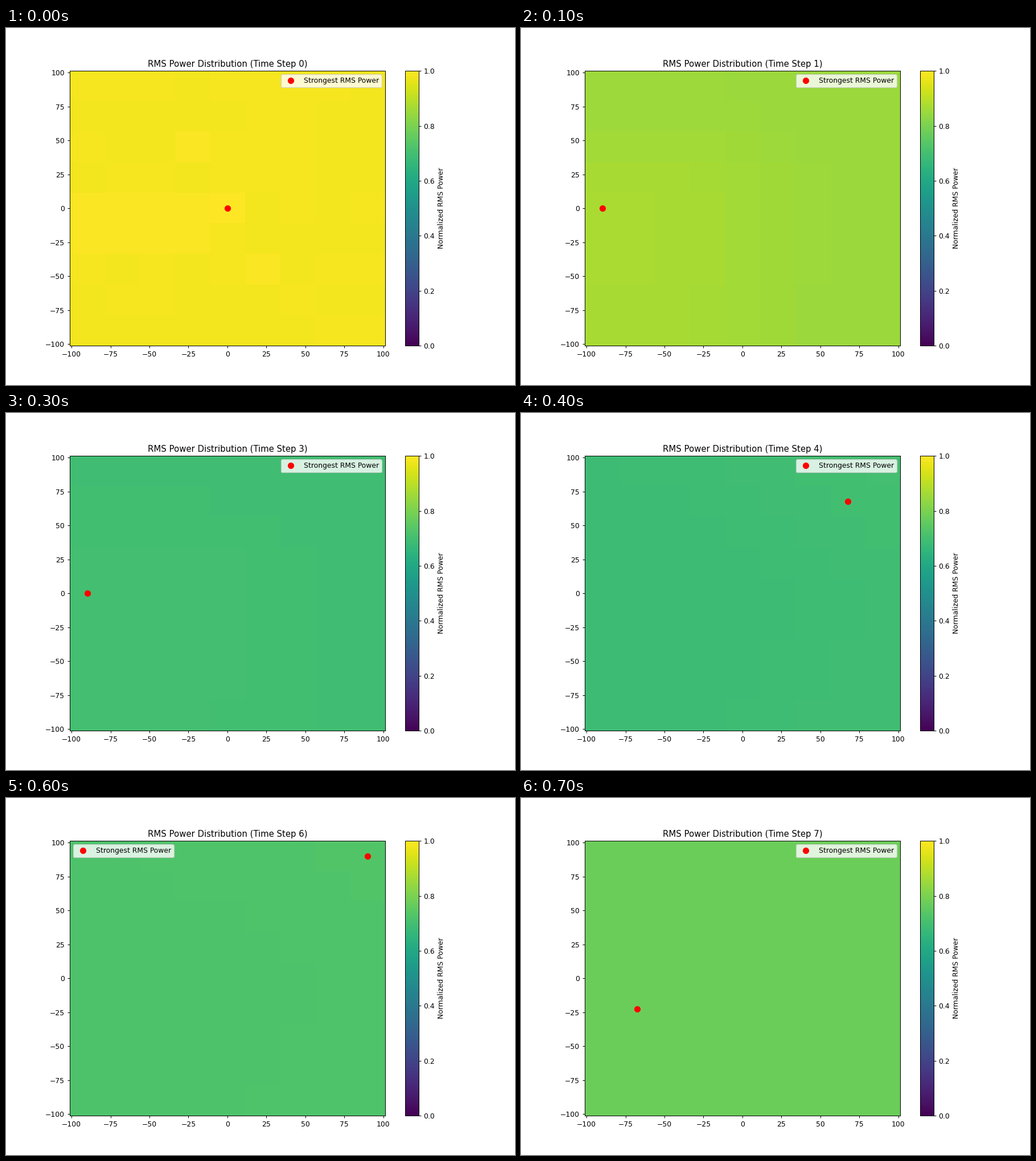
These frames come from a looping animation (894 by 626 pixels, 0.8 s). A matplotlib script:

```python
import matplotlib.pyplot as plt
import numpy as np
from matplotlib.animation import FuncAnimation

DPI = 89.4
STEPS = 8
CELLS = 9
PITCH = 22.5
HALF = CELLS * PITCH / 2
LEVELS = 256  # colour levels of the map

axis = (np.arange(CELLS) - CELLS // 2) * PITCH
X, Y = np.meshgrid(axis, axis)


def fall(t, middle, width):
    """Smooth drop from 1 to 0 around the middle."""
    return 1 / (1 + np.exp((t - middle) / width))


def ripple():
    """Nearly saturated noise with a bright band left of the centre."""
    drop = np.random.default_rng(4).integers(3, 5, X.shape)
    drop[(X < 0) & (abs(Y + PITCH / 2) < PITCH)] = 1
    drop[abs(X + Y / 2) + abs(Y) < 1] = 0
    drop[(X == -Y / 2) & (abs(Y) == 2 * PITCH)] = 1
    return LEVELS - 1 - drop


def lobe(base, rise, edge, width):
    """High on the left, fading to the right and above."""
    rows = 0.2 + 0.8 * fall(Y, 45, 10) - 0.15 * fall(Y, -55, 10)
    return np.round(base + rise * rows * fall(X, edge, width))


def tilt(low, start, gap):
    """Terraces that climb towards the upper right."""
    climb = X + 1.1 * np.maximum(Y, 0) + 0.5 * np.maximum(-Y - 20, 0)
    return low + np.maximum(0, np.floor((climb - start) / gap) + 1)


FIELDS = [
    ripple(),
    lobe(216.5, 6.5, 10, 22),
    lobe(182.5, 8, 35, 20),
    lobe(177, 2, 35, 20),
    tilt(175, 30, 48),
    tilt(177, 40, 70),
    tilt(184, 50.5, 100),
    np.full(X.shape, 198),
]
PEAKS = [(0, 0), (-90, 0), (-90, 0), (-90, 0),
         (67.5, 67.5), (67.5, 67.5), (90, 90), (-67.5, -22.5)]


def power(step):
    return (FIELDS[step] + 0.5) / LEVELS


fig, ax = plt.subplots(figsize=(894 / DPI, (626 + 1e-6) / DPI), dpi=DPI)
image = ax.imshow(power(0), cmap="viridis", vmin=0, vmax=1, aspect="auto",
                  origin="lower", interpolation="nearest",
                  extent=(-HALF, HALF, -HALF, HALF))
fig.colorbar(image, ax=ax, label="Normalized RMS Power")
peak, = ax.plot([0], [0], "ro", markersize=8, label="Strongest RMS Power")
ax.set(xlim=(-HALF, HALF), ylim=(-HALF, HALF))
title = ax.set_title("")
legend = ax.legend(loc="upper right")


def update(step):
    x, y = PEAKS[step]
    image.set_data(power(step))
    peak.set_data([x], [y])
    title.set_text(f"RMS Power Distribution (Time Step {step})")
    # The legend makes way for a peak in its corner
    legend.set_loc("upper left" if x > 40 and y > 85 else "upper right")
    return image, peak, title, legend


anim = FuncAnimation(fig, update, frames=STEPS, interval=100,
                     repeat=True, repeat_delay=0, blit=False)
plt.show()
```
